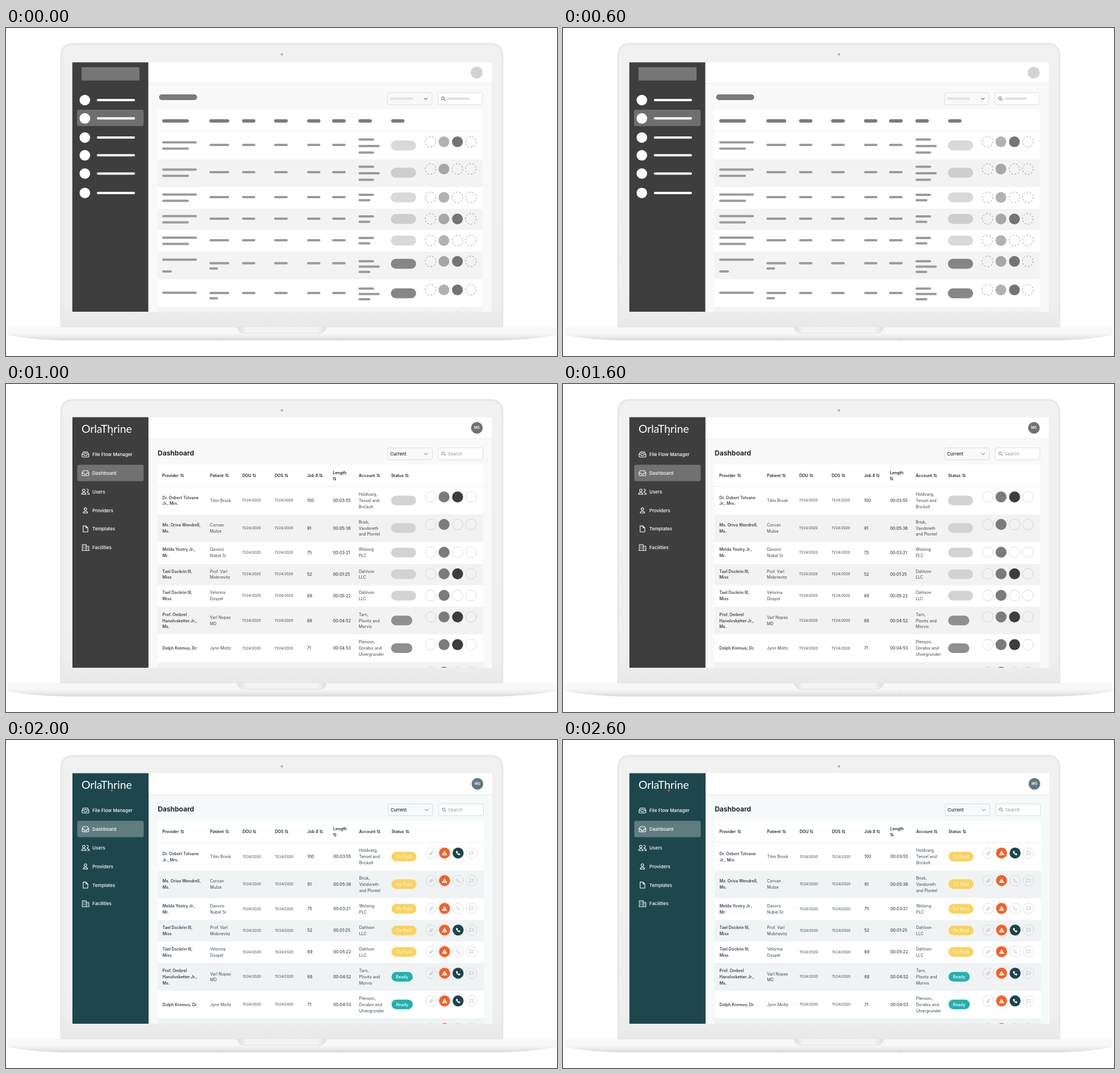
These frames come from a looping animation (970x578 px, 3000 ms). An HTML page:

```html
<!DOCTYPE html>
<html lang="en">
<head>
<meta charset="utf-8">
<title>Dashboard on a laptop</title>
<style>
html, body { margin: 0; width: 100%; height: 100%; overflow: hidden; background: #fff; }
svg { display: block; width: 100vw; height: 100vh; }
text { font-family: Inter, Roboto, sans-serif; }
.logo { font-family: Lato, Inter, sans-serif; }
</style>
</head>
<body>
<svg id="stage" viewBox="0 0 970 578">
  <defs>
    <linearGradient id="lid" x1="0" y1="0" x2="0" y2="1">
      <stop offset="0" stop-color="#f1f1f1"/>
      <stop offset=".9" stop-color="#efefef"/>
      <stop offset="1" stop-color="#e9e9e9"/>
    </linearGradient>
    <linearGradient id="base" x1="0" y1="0" x2="0" y2="1">
      <stop offset="0" stop-color="#f8f8f8"/>
      <stop offset=".45" stop-color="#f7f7f7"/>
      <stop offset=".72" stop-color="#ececec"/>
      <stop offset="1" stop-color="#d9d9d9"/>
    </linearGradient>
    <linearGradient id="notch" x1="0" y1="0" x2="1" y2="0">
      <stop offset="0" stop-color="#dedede"/>
      <stop offset=".1" stop-color="#f3f3f3"/>
      <stop offset=".9" stop-color="#f3f3f3"/>
      <stop offset="1" stop-color="#dedede"/>
    </linearGradient>
    <clipPath id="screen"><rect x="116.5" y="58" width="740" height="442"/></clipPath>
  </defs>
  <path d="M97 527V50Q97 28 119 28H852Q874 28 874 50V527Z" fill="url(#lid)" stroke="#e7e7e7" stroke-width="3"/>
  <circle cx="485.7" cy="46.5" r="2.4" fill="#bdbdbd"/>
  <path d="M3 527.5H968V541C945 546 900 550.5 860 550.5H110C70 550.5 26 546 3 541Z" fill="url(#base)"/>
  <path d="M407 527H564Q563 538 551 538H420Q408 538 407 527Z" fill="url(#notch)"/>
  <path d="M408 530Q410 538 420 538H551Q561 538 563 530" fill="none" stroke="#e2e2e2"/>
  <path d="M374 547h4M592 547h4" stroke="#d6d6d6" stroke-width="1.5"/>
  <g id="view" clip-path="url(#screen)"></g>
</svg>
<script>
const STEP = 1000;
const ROWS = [
  { who: ["Dr. Osbert Tolvane", "Jr., Mrs."], patient: ["Tilmi Brosk"], job: "100", len: "00:03:55", account: ["Holdvarg,", "Tensel and", "Brickolt"], call: 1 },
  { who: ["Ms. Oriva Wendrell,", "Ms."], patient: ["Corvan", "Mulze"], job: "91", len: "00:05:36", account: ["Brisk,", "Vandoreth", "and Plontel"] },
  { who: ["Melda Yostry Jr.,", "Mr."], patient: ["Davoric", "Nubel Sr."], job: "75", len: "00:03:21", account: ["Wolsing", "PLC"] },
  { who: ["Tael Dockrin III,", "Miss"], patient: ["Prof. Varl", "Mobrievitz"], job: "52", len: "00:01:25", account: ["Dahlvon", "LLC"], call: 1 },
  { who: ["Tael Dockrin III,", "Miss"], patient: ["Velorina", "Dospel"], job: "69", len: "00:05:22", account: ["Dahlvon", "LLC"] },
  { who: ["Prof. Ombrel", "Hanolvsketter Jr.,", "Ms."], patient: ["Varl Nopas", "MD"], job: "68", len: "00:04:52", account: ["Tarn,", "Plovitz and", "Morvis"], call: 1, ready: 1 },
  { who: ["Dolph Kremus, Dr."], patient: ["Jynn Moltz"], job: "71", len: "00:04:53", account: ["Plenson,", "Dorabix and", "Ulvergrunder"], call: 1, ready: 1 }
];
const TOPS = [180.5, 230, 278.5, 317, 354.5, 392.5, 441, 490, 502];
const MIDS = [205.5, 254, 297.3, 335.5, 373.3, 417, 465.7];
const DOTS_Y = [199, 247.5, 296.5, 334.5, 372.5, 410.5, 459.3, 508];
const DOTS_X = [747.7, 771.2, 795, 818.6];

const GRAY = {
  side: "#3e3e3e", active: "#717171", bg: "#f9f9f9", stripe: "#f2f2f2", line: "#ececec",
  head: "#252525", ink: "#414141", avatar: "#717171", hold: "#d3d3d3", ready: "#8f8f8f",
  alert: "#7b7b7b", call: "#3d3d3d", ring: "#b5b5b5", dot: "#c8c8c8", box: "#dcdcdc", soft: "#999"
};
const COLOR = {
  side: "#1d474d", active: "#5f7c81", bg: "#f6fafa", stripe: "#eff3f4", line: "#e8eded",
  head: "#1c2b33", ink: "#36454f", avatar: "#5f7a80", hold: "#fdd25c", ready: "#23b0af",
  alert: "#f95f26", call: "#1c454b", ring: "#b4bdc0", dot: "#f95f26", box: "#d5dcde", soft: "#929da3", full: true
};

const rect = (x, y, r, b, fill, more = "") =>
  `<rect x="${x}" y="${y}" width="${r - x}" height="${b - y}" fill="${fill}" ${more}/>`;
const bar = (x, r, y, h, fill) => rect(x, y - h / 2, r, y + h / 2, fill, `rx="${h / 2}"`);
const disc = (x, y, r, fill, more = "") => `<circle cx="${x}" cy="${y}" r="${r}" fill="${fill}" ${more}/>`;
const line = (d, color, w = 1) =>
  `<path d="${d}" fill="none" stroke="${color}" stroke-width="${w}" stroke-linecap="round" stroke-linejoin="round"/>`;
const at = (x, y, body) => `<g transform="translate(${x} ${y})">${body}</g>`;
// y is the middle of the capitals
const label = (x, y, s, size, weight, fill, more = "") =>
  `<text x="${x}" y="${y + size * .36}" font-size="${size}" font-weight="${weight}" fill="${fill}" ${more}>${s}</text>`;
const lines = (x, mid, list, weight, fill) =>
  list.map((s, i) => label(x, mid + (i - (list.length - 1) / 2) * 10.8, s, 7.1, weight, fill)).join("");
const chevron = (x, y, c) => line(`M${x - 2.7} ${y - 1.3}l2.7 2.7 2.7 -2.7`, c, 1.1);
const lens = (x, y, c) => disc(x - .8, y - .8, 2.4, "none", `stroke="${c}" stroke-width="1.1"`) +
  line(`M${x + 1.1} ${y + 1.1}l2.1 2.1`, c, 1.2);

function fields(y, edge, icon, bg) {
  const frame = `rx="3" stroke="${edge}"`;
  return rect(672, y - 10.5, 750.5, y + 10.5, bg, frame) + rect(761, y - 10.5, 839.5, y + 10.5, "#fff", frame) +
    chevron(739.5, y + .3, icon) + lens(770.5, y, icon);
}

function skeleton() {
  const dark = "#7a7a7a", mid = "#9a9a9a", dy = 1.6;
  const cols = [[358, 393], [415.5, 439], [472, 496], [530, 553.5], [574, 598]];
  const midY = [206, 254, 298, 336, 374, 414.5, 467];
  const pillY = [207, 255, 298.5, 336.5, 374.5, 415.5, 467.5];
  const dotY = [200.5, 248.5, 298.5, 336.5, 374.5, 411.3, 461.5, 509.5];
  let s = rect(250, 60.5, 855, 500, "#f9f9f9") + rect(250, 60.5, 855, 97.5, "#fff") +
    rect(250, 97, 855, 98, "#ececec") + rect(116.5, 60.5, 250.5, 500, GRAY.side) +
    rect(133, 69, 235, 92.5, "#767676") + rect(125, 144, 242.3, 172.7, "#6f6f6f", 'rx="3"');
  [127, 159.3, 193, 224.3, 256.5, 290.7].forEach(y => {
    s += disc(138.8, y, 9.3, "#fff") + bar(160, 227, y, 4, "#fff");
  });
  s += disc(828.7, 78.7, 10.5, "#d3d3d3") + bar(269.5, 336.5, 122, 10, dark);
  s += at(-.6, 0, fields(124.5, "#dedede", "#777", "#f9f9f9")) +
    bar(676, 716.5, 124.5, 4, "#e2e2e2") + bar(777, 817, 124.5, 4, "#e2e2e2");
  s += rect(266.5, 143, 839, 500, "#fff") + rect(266.5, 181.3, 839, 182.3, "#f1f1f1");
  [[275, 322], ...cols, [620.5, 644], [678, 701.5]].forEach(([a, b]) => s += bar(a, b, 163.7, 6, dark));
  for (let i = 0; i < 8; i++) {
    const odd = i % 2;
    if (odd) s += rect(266.5, TOPS[i] + dy, 839, TOPS[i + 1] + dy, "#f3f3f3");
    DOTS_X.forEach((x, k) => {
      const solid = k == 1 || (k == 2 && i < 7 && ROWS[i].call);
      s += solid ? disc(x - .3, dotY[i], 9.5, k == 2 ? "#747474" : odd ? "#a7a7a7" : "#b2b2b2")
        : disc(x - .3, dotY[i], 9.4, "none", 'stroke="#8a8a8a" stroke-width="1" stroke-dasharray="2.6 3.3"');
    });
    if (i == 7) break;
    const y = midY[i], row = ROWS[i];
    if (i < 5) s += bar(275, 336, y - 4.5, 4, mid) + bar(275, 322, y + 6.6, 4, mid);
    else s += bar(275, 336, i == 5 ? 408.3 : 466.5, 4, mid);
    if (i == 5) s += bar(275, 292, 429, 4, mid);
    cols.forEach(([a, b]) => s += bar(a, b, y, 4, mid));
    if (i > 4) s += bar(358, 373.3, y + 9.3, 4, mid);
    const first = i < 2 ? y - 9.5 : i < 5 ? y - 4 : i == 5 ? 411 : 459.3;
    const ends = i < 2 ? [648, 658, 648] : i < 5 ? [648, 641.5] : [648, 658, 641.5];
    ends.forEach((e, k) => s += bar(620.5, e, first + k * (i < 2 ? 11.5 : 9.4), 4, mid));
    s += bar(677.5, 722, pillY[i], 17.3, row.ready ? "#868686" : odd ? "#cecece" : "#d9d9d9");
  }
  return s;
}

const tray = line("M-6 0L-3.8 -4.3H3.8L6 0V3Q6 4.5 4.5 4.5H-4.5Q-6 4.5 -6 3ZM-6 0H-3L-1.7 2H1.7L3 0H6", "#fff", 1.1);
const person = x => disc(x, -2.3, 2.2, "none", 'stroke="#fff" stroke-width="1.1"') +
  line(`M${x - 3.8} 4.7Q${x - 3.8} 1.6 ${x} 1.6T${x + 3.8} 4.7Z`, "#fff", 1.1);
const NAV = [
  ["File Flow Manager", tray + line("M-2.6 -1.7H2.6", "#fff")],
  ["Dashboard", tray],
  ["Users", person(-2.9) + line("M2.3 -4.4A2.2 2.2 0 1 1 2.3 -.2M3 1.7Q6.8 1.7 6.8 4.7H3.6", "#fff", 1.1)],
  ["Providers", person(0)],
  ["Templates", line("M-4 -5.3H1L4.2 -2V5.3H-4ZM1 -5.3V-2H4.2", "#fff", 1.1)],
  ["Facilities", line("M-5.5 5.3V-5.3H1.5V5.3M1.5 -2.3H6V5.3M-6 5.3H6.5M-3.5 -3H-3M-.8 -3H-.3M-3.5 -.5H-3M-.8 -.5H-.3M-3.5 2H-3M-.8 2H-.3M3.6 0H4M3.6 2.5H4", "#fff")]
];
const HEADS = [[275, "Provider", 310], [359, "Patient", 389], [416, "DOU", 437], [473, "DOS", 493.5],
  [530, "Job #", 554.3], [575.5, "Length", 578.3], [621, "Account", 655.3], [678, "Status", 705.8]];
const sortIcon = (x, y, c) => at(x, y, line("M-1.4 2.5V-2.5M-2.6 -1.3L-1.4 -2.5L-.2 -1.3M1.4 -2.5V2.5M.2 1.3L1.4 2.5L2.6 1.3", c, .9));

function symbol(kind, p) {
  if (kind == 0) return line("M2.8 -.4L-.3 2.8Q-1.6 4 -2.7 2.9Q-3.8 1.8 -2.6 .5L.9 -3Q1.9 -3.8 2.7 -3Q3.5 -2.2 2.6 -1.2L-.7 2.1Q-1.5 2.5 -1.6 1.5L1 -1.1", p.ring, .8);
  if (kind == 1) return `<path d="M0 -3.4L4 3.4H-4Z" fill="#fff" stroke="#fff" stroke-linejoin="round"/>` +
    line("M0 -1.1V.9M0 2.4V2.5", p.alert);
  if (kind == 3) return line("M-3.2 4V-3.2H-.2L.4 -2.5H3.5L2.5 -.2L3.5 2H.4L-.2 1.4H-3.2", p.ring, .8);
  return "";
}
const phone = (fill, edge) => `<path d="M-3.4 -2.6L-1.8 -3.6L-.5 -1.3L-1.4 -.4Q-.8 .9 .5 1.5L1.4 .6L3.6 1.9L2.7 3.5Q.8 3.8 -1.4 1.5T-3.4 -2.6Z" fill="${fill}" stroke="${edge}" stroke-width=".7" stroke-linejoin="round"/>`;

function actions(i, p) {
  return DOTS_X.map((x, k) => {
    const call = k == 2 && i < 7 && ROWS[i].call;
    let s = k == 1 || call ? disc(0, 0, 9.7, call ? p.call : p.alert)
      : disc(0, 0, 9.3, "none", `stroke="${p.ring}" stroke-width=".9" stroke-dasharray="1.2 .9"`);
    if (p.full) s += k == 2 ? phone(call ? "#fff" : "none", call ? "#fff" : p.ring) : symbol(k, p);
    return at(x, DOTS_Y[i], s);
  }).join("");
}

function dashboard(p) {
  let s = rect(250, 58.5, 855, 502, p.bg) + rect(250, 58.5, 855, 96.5, "#fff") + rect(250, 96, 855, 97, p.line) +
    rect(116.8, 58.5, 250.8, 502, p.side) + rect(125.5, 142.3, 242.3, 171.2, p.active, 'rx="3"');
  s += label(133, 79, "OrlaThrine", 19.3, 400, "#fff", 'class="logo"') + disc(186, 89, 1.6, p.dot);
  NAV.forEach(([name, icon], i) => {
    const y = 124.2 + i * 32.8;
    s += at(139.8, y, icon) + label(152, y, name, 8.1, 500, "#fff");
  });
  s += disc(829, 77.2, 10.3, p.avatar) + label(829, 77.2, "MG", 6, 600, "#fff", 'text-anchor="middle"');
  s += label(267, 121.7, "Dashboard", 12, 700, p.head) + fields(123, p.box, p.soft, p.bg) +
    label(676.3, 123.2, "Current", 7.8, 500, p.head) + label(777.5, 123.2, "Search", 7.8, 400, p.soft);
  s += rect(267, 142, 840, 502, "#fff") + rect(267, 180, 840, 181, p.line);
  HEADS.forEach(([x, name, sx]) => {
    const two = name == "Length";
    s += label(x, two ? 156 : 161, name, 7.1, 600, p.head) + sortIcon(sx, two ? 166.7 : 161.2, p.head);
  });
  for (let i = 0; i < 8; i++) {
    if (i % 2) s += rect(267, TOPS[i], 840, TOPS[i + 1], p.stripe);
    s += actions(i, p);
    if (i == 7) break;
    const r = ROWS[i], y = MIDS[i], end = r.ready ? 715.3 : 721.8;
    s += lines(275.3, y, r.who, 600, p.ink) + lines(359, y, r.patient, 400, p.ink);
    [416, 473].forEach(x => s += label(x, y - .3, "11/24/2020", 6.2, 400, p.ink));
    s += label(530, y, r.job, 7.1, 500, p.ink) + label(575.7, y, r.len, 7.1, 500, p.ink) +
      lines(621, y, r.account, 400, p.ink) + bar(678, end, y - .2, 17, r.ready ? p.ready : p.hold);
    if (p.full) s += label((678 + end) / 2, y, r.ready ? "Ready" : "On Hold", 7.2, 500, "#fff", 'text-anchor="middle"');
  }
  return s;
}

const grow = .0013;
const views = [
  skeleton(),
  dashboard(GRAY),
  `<g transform="translate(${-117 * grow} ${-59 * grow}) scale(${1 + grow})">${dashboard(COLOR)}</g>`
];
const view = document.getElementById("view");
let shown = -1;

function draw(ms) {
  const i = Math.floor(ms / STEP) % views.length;
  if (i !== shown) view.innerHTML = views[shown = i];
}
const start = performance.now();
function tick() {
  draw(performance.now() - start);
  requestAnimationFrame(tick);
}
tick();
</script>
</body>
</html>
```
